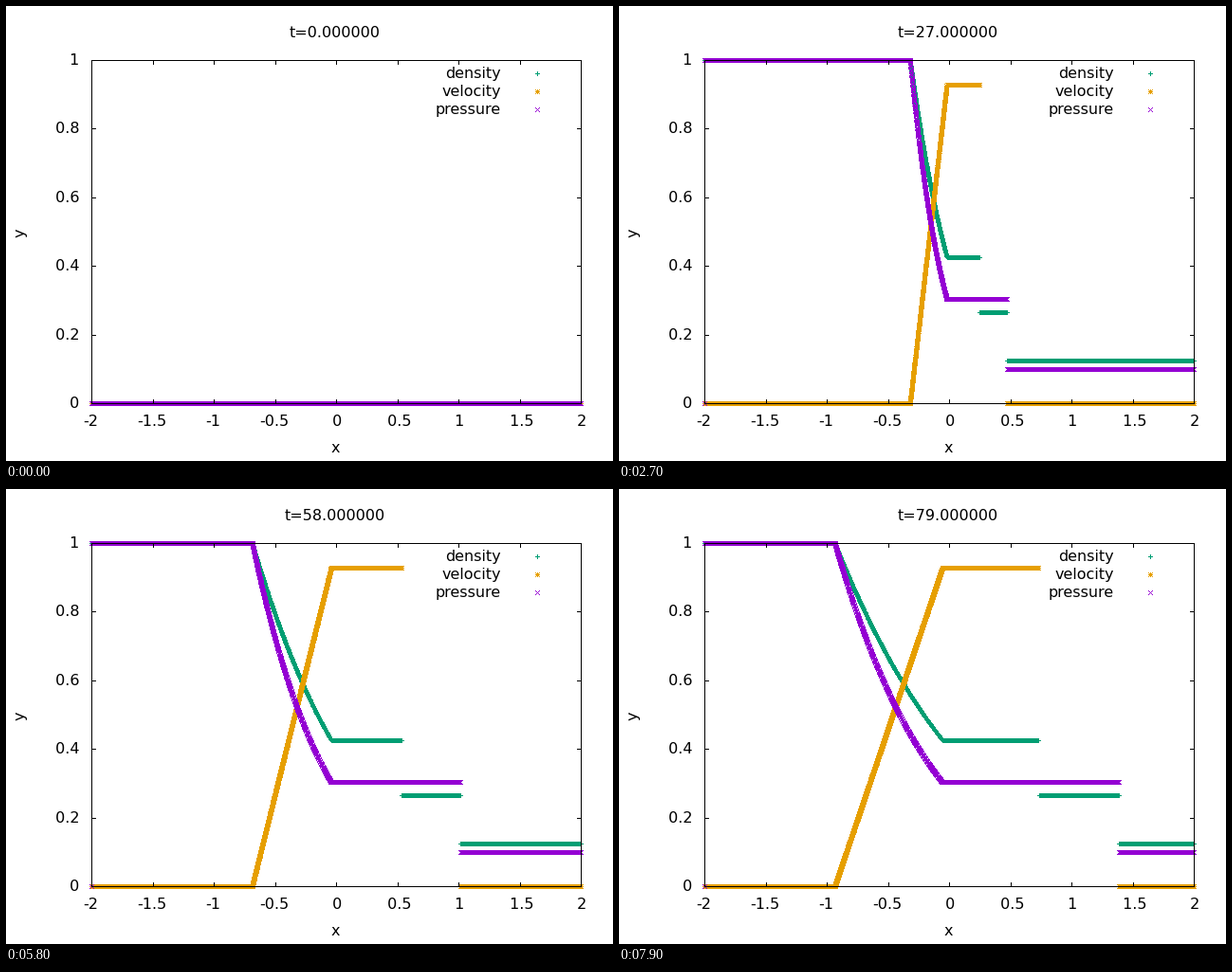
Write a matplotlib script that moves like this. It is 640 by 480 pixels and loops after 8000 ms.

```python
import numpy as np
import matplotlib.pyplot as plt
from matplotlib.animation import FuncAnimation

W, H, DPI = 640, 480, 100
FRAMES, INTERVAL = 80, 100
LEFT, RIGHT, TOP, BOTTOM = 90, 606, 57, 419
GREEN, ORANGE, PURPLE = "#009e73", "#e69f00", "#9400d3"

plt.rcParams.update({"font.family": "DejaVu Sans", "font.size": 16 * 72 / DPI,
                     "text.hinting_factor": 64, "path.simplify": False})

# Shock tube: left state (1, 0, 1), right state (0.125, 0, 0.1)
GAMMA = 1.4
C_LEFT = np.sqrt(GAMMA)
P_STAR, U_STAR = 0.30313, 0.92745
RHO_L, RHO_R = 0.42632, 0.26557
SHOCK, TAIL = 1.75216, -0.07027
X = np.linspace(-2, 2, 4001)

# Markers as the pixels they cover around the centre
ARM = range(-2, 3)
PLUS = np.array([(d, 0) for d in ARM] + [(0, d) for d in ARM])
CROSS = np.array([(d, d) for d in ARM] + [(d, -d) for d in ARM])
STAR = np.concatenate([PLUS, CROSS])

fig = plt.figure(figsize=(W / DPI, H / DPI), dpi=DPI, facecolor="white")
ax = fig.add_axes([0, 0, 1, 1])
ax.set(xlim=(0, W), ylim=(H, 0))
ax.axis("off")


def to_px(x, y):
    x, y = np.broadcast_arrays(x, y)
    px = np.stack([LEFT + (x + 2) / 4 * (RIGHT - LEFT),
                   BOTTOM - y * (BOTTOM - TOP)], axis=-1)
    return np.floor(px + 0.5)


def join(segs):
    """Chain separate segments into one NaN-broken line at pixel centres."""
    segs = np.asarray(segs, float).reshape(-1, 2, 2) + 0.5
    gaps = np.full((len(segs), 1, 2), np.nan)
    return np.concatenate([segs, gaps], axis=1).reshape(-1, 2).T


def stamp(marker, pts):
    """Cover every marker pixel with a dash one pixel long."""
    pts = np.asarray(pts, float).reshape(-1, 2)
    pts = np.unique(pts[np.isfinite(pts).all(axis=1)], axis=0)
    dots = np.unique((pts[:, None] + marker).reshape(-1, 2), axis=0)
    half = np.array([0.5, 0])
    return join(np.stack([dots - half, dots + half], axis=1))


def stroke(data, color, z):
    return ax.plot(*data, color=color, lw=72 / DPI, antialiased=False, snap=False,
                   solid_capstyle="butt", zorder=z)[0]


def label(x, y, s, ha="center", **kw):
    return ax.text(x, y, s, ha=ha, va="baseline", color="black", zorder=6, **kw)


def solve(t):
    if t == 0:
        zero = np.zeros_like(X)
        return zero, zero, zero
    s = X / t
    u_fan = 2 / (GAMMA + 1) * (C_LEFT + s)
    a = np.clip(1 - (GAMMA - 1) / 2 * u_fan / C_LEFT, 0, None)
    zones = [s < -C_LEFT, s < TAIL, s < U_STAR, s < SHOCK]
    rho = np.select(zones, [1, a ** 5, RHO_L, RHO_R], 0.125)
    # No velocity is plotted between contact and shock
    u = np.select(zones, [0, u_fan, U_STAR, np.nan], 0)
    p = np.select(zones, [1, a ** 7, P_STAR, P_STAR], 0.1)
    p[0] = 0  # the boundary cell is never filled
    return rho, u, p


def draw_frame():
    segs = [[(LEFT - .5, y), (RIGHT + .5, y)] for y in (TOP, BOTTOM)]
    segs += [[(x, TOP - .5), (x, BOTTOM + .5)] for x in (LEFT, RIGHT)]
    for v in np.arange(-2, 2.1, 0.5):
        x = to_px(v, 0)[0]
        segs += [[(x, BOTTOM), (x, BOTTOM - 4.5)], [(x, TOP), (x, TOP + 4.5)]]
        label(x - 1.2, 443, f"{v: g}")
    for v in np.arange(0, 1.1, 0.2):
        y = to_px(0, v)[1]
        segs += [[(LEFT, y), (LEFT + 4.5, y)], [(RIGHT, y), (RIGHT - 4.5, y)]]
        label(77.2, y + 5, f"{v: .1g}", ha="right")
    stroke(join(segs), "black", 5)
    label(347, 471, "x")
    label(19.5, 239, "y", rotation=90, rotation_mode="anchor")


def draw_key():
    rows = [("density", PLUS, GREEN), ("velocity", STAR, ORANGE),
            ("pressure", CROSS, PURPLE)]
    for i, (name, marker, color) in enumerate(rows):
        y = 71 + 19 * i
        label(522, y + 5, name, ha="right")
        stroke(stamp(marker, [(560, y)]), color, 4)


draw_frame()
draw_key()
title = label(346.5, 33, "")
density = stroke(([], []), GREEN, 1)
velocity = stroke(([], []), ORANGE, 2)
pressure = stroke(([], []), PURPLE, 3)


def update(i):
    rho, u, p = solve(i / 100)
    title.set_text(f"t={i:.6f}")
    density.set_data(*stamp(PLUS, to_px(X, rho)))
    velocity.set_data(*stamp(STAR, to_px(X, u)))
    pressure.set_data(*stamp(CROSS, to_px(X, p)))
    return title, density, velocity, pressure


anim = FuncAnimation(fig, update, frames=FRAMES, interval=INTERVAL,
                     repeat=True, repeat_delay=0, blit=False)
plt.show()
```
